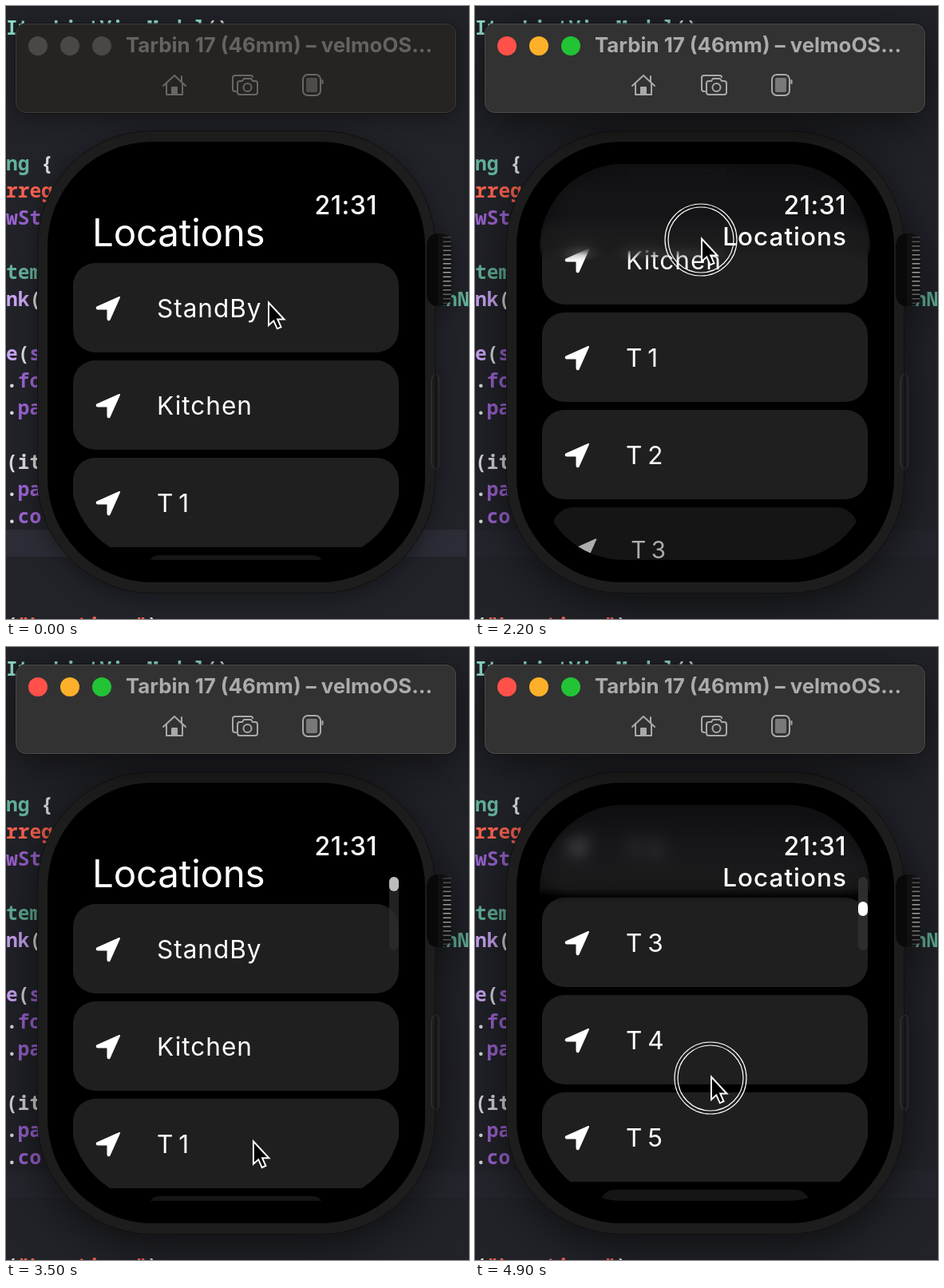
Animation, 580 px wide and 768 px high, one loop 5000 ms. Source, as an HTML page:

```html
<!DOCTYPE html>
<html lang="en">
<head>
<meta charset="utf-8">
<title>Watch simulator</title>
<style>
html, body { margin: 0; width: 100%; height: 100%; overflow: hidden; background: #222329; }
#stage { position: relative; width: 580px; height: 768px; overflow: hidden; background: #222329;
  font-family: Inter, "Open Sans", sans-serif; color: #fff;
  --bar: #262421; --edge: #403e3b; --ink: #696765; --title: #656361; --line: #2b2c35;
  --c1: #4a4845; --c2: #4a4845; --c3: #4a4845; --shade: 0 5px 14px rgba(0,0,0,.4); }
#stage.active { --bar: #323232; --edge: #4b4b4b; --ink: #a9a9a9; --title: #ababab; --line: #25262d;
  --c1: #ff5149; --c2: #ffb02a; --c3: #23c336; --shade: 0 12px 30px rgba(0,0,0,.6); }
svg.full { position: absolute; left: 0; top: 0; width: 580px; height: 768px; }
#code { font: 600 24.5px "Noto Sans Mono", "DejaVu Sans Mono", monospace; white-space: pre; }
.window { filter: drop-shadow(var(--shade)); }
.icon { fill: none; stroke: var(--ink); stroke-width: 2; stroke-linejoin: round; stroke-linecap: round; }
#screen { position: absolute; left: 81px; top: 198px; width: 414px; height: 496px;
  border-radius: 105px; overflow: hidden; }
#screen div { position: absolute; white-space: nowrap; }
#screen .row { left: 3px; top: 0; width: 408px; height: 112px; border-radius: 28px;
  background: #1f1f1f; transform-origin: 50% 0; }
.row svg { position: absolute; left: 28px; top: 41px; width: 32px; height: 32px; }
.row span { position: absolute; left: 105px; top: 0; font-size: 31.5px; line-height: 113px;
  letter-spacing: 1px; word-spacing: -4px; }
#frost, #tint { left: 0; top: 0; width: 414px; height: 125px; }
#frost { backdrop-filter: blur(10px);
  -webkit-mask-image: linear-gradient(#000 82%, transparent 98%); mask-image: linear-gradient(#000 82%, transparent 98%); }
#tint { background: linear-gradient(#0f0f11, rgba(22,22,25,.66) 50%, rgba(26,26,28,.66) 82%, rgba(26,26,28,0) 91%); }
#screen #big { left: 27px; top: 55px; font-size: 47.5px; line-height: 62px; letter-spacing: -.2px; }
#screen #mini { right: 29px; top: 70px; font-size: 31.5px; line-height: 42px; letter-spacing: 1px; font-weight: 500; }
#screen #time { right: 30px; top: 31px; font-size: 32px; line-height: 42px; letter-spacing: .5px; font-weight: 500; }
#track { position: absolute; left: 480px; top: 288px; width: 12px; height: 92px; border-radius: 6px; background: #2d2d2d; }
#thumb { position: absolute; left: 0; width: 12px; height: 18px; border-radius: 6px; background: #fff; }
</style>
</head>
<body>
<div id="stage">
  <svg class="full">
    <rect y="656" width="577" height="34" fill="var(--line)"/>
    <g id="code"></g>
    <g class="window">
      <rect x="527" y="285" width="31" height="91" rx="13" fill="#101011"/>
      <rect x="533" y="461" width="9" height="119" rx="5" fill="#17171a" stroke="#36363a"/>
      <rect x="39.5" y="156.5" width="498" height="579" rx="143" fill="#1d1d1d" stroke="#111"/>
    </g>
    <path d="M541 285q-14 0-14 18v55q0 18 14 18z" fill="#090909"/>
    <g id="ridges"></g>
    <path d="M537 462q-4 2-4 9v99q0 7 4 9" fill="none" stroke="#3a3a3d"/>
    <rect x="52" y="170" width="473" height="552" rx="131" fill="#000"/>
    <g class="window">
      <rect x="11.5" y="21.5" width="553" height="113" rx="13" fill="#0b0b0b"/>
      <rect x="12.5" y="22.5" width="551" height="111" rx="12" fill="var(--bar)" stroke="var(--edge)"/>
    </g>
    <circle cx="40" cy="50" r="12" fill="var(--c1)"/>
    <circle cx="80" cy="50" r="12" fill="var(--c2)"/>
    <circle cx="120" cy="50" r="12" fill="var(--c3)"/>
    <text x="150" y="58" font-size="25.8" font-weight="700" fill="var(--title)">Tarbin 17 (46mm) – velmoOS...</text>
    <g class="icon">
      <path d="M197 100L211 87L225 100M201 97V111H221V97M220 95V88"/>
      <path d="M208 111V102H214V111Z" fill="var(--ink)"/>
      <path d="M288 107H287Q284 107 284 104V90Q284 87 287 87H306Q309 87 309 89"/>
      <path d="M293 94H296L298 91H307L309 94H312Q315 94 315 97V108Q315 111 312 111H293Q290 111 290 108V97Q290 94 293 94Z"/>
      <circle cx="302.5" cy="102" r="5"/>
      <rect x="372" y="86" width="22" height="26" rx="6"/>
      <rect x="376" y="90" width="14" height="18" rx="2" fill="var(--ink)" fill-opacity=".6" stroke="none"/>
      <path d="M396.5 93V97"/>
    </g>
  </svg>
  <div id="screen">
    <div id="rows"></div>
    <div id="frost"></div>
    <div id="tint"></div>
    <div id="big">Locations</div>
    <div id="mini">Locations</div>
    <div id="time">21:31</div>
  </div>
  <div id="track"><div id="thumb"></div></div>
  <svg class="full">
    <g id="pointer">
      <g id="ring" fill="none" stroke="#fff" stroke-width="1.2">
        <circle cy="3" r="45"/><circle cy="3" r="41"/>
      </g>
      <path d="M1 1.5V30L7.300 24.300L11.800 34.300L16.500 32.200L12.200 22.500H20.500Z" fill="#000" stroke="#fff" stroke-width="2"/>
    </g>
  </svg>
</div>
<script>
const $ = id => document.getElementById(id);
const clamp = (v, lo = 0, hi = 1) => Math.min(hi, Math.max(lo, v));
const smooth = u => u * u * (3 - 2 * u);
const ramp = (t, a, b) => smooth(clamp((t - a) / (b - a)));
const pulse = (t, a, b, c, d) => ramp(t, a, b) - ramp(t, c, d);

const DURATION = 5000, STEP = 100;
const PITCH = 122, FIRST = 124, EDGE = 381;

// Editor text: each word takes the next colour, punctuation stays white
const white = '#d9d9dc', teal = '#63b29a', red = '#f7614f', purple = '#9b63d0', lilac = '#c9a3f3';
const code = [
  ['ItemListViewModel()', '#93e3cd'], [], [], [], [],
  ['ng {', teal], ['rreg', red], ['wSt', purple], [],
  ['tem', teal], ['nk(', lilac], [],
  ['e(s', lilac, purple], ['.fo', purple], ['.pa', purple], [],
  ['(it', white], ['.pa', purple], ['.co', purple], [], [], [],
  ['("Locations")', red]
];

function codeLine([text = '', ...colours], row, x = 0) {
  let word = 0;
  const spans = text.replace(/[\w"]+|[^\w"]+/g, part =>
    `<tspan fill="${/\w/.test(part) ? colours[word++] : white}">${part}</tspan>`);
  return `<text x="${x}" y="${36 + row * 34}" xml:space="preserve">${spans}</text>`;
}
$('code').innerHTML = code.map((line, i) => codeLine(line, i)).join('') + codeLine(['inN', teal], 10, 536);

$('ridges').innerHTML = Array.from({ length: 16 }, (_, i) => {
  const glow = 0.2 + 0.6 * Math.sin(Math.PI * (i + 0.5) / 16);
  return `<rect x="547.5" y="${289 + i * 5.5}" width="10" height="1.6" fill="#bbb" opacity="${glow}"/>`;
}).join('');

const arrow = '<svg><path d="M30 2L2 14.5Q1 16 3 16.5H14.5Q15.5 16.5 15.5 17.5V29Q16 31 17.5 30Z" ' +
  'fill="#fff" stroke="#fff" stroke-width="2" stroke-linejoin="round"/></svg>';
const names = ['StandBy', 'Kitchen', ...Array.from({ length: 8 }, (_, i) => 'T ' + (i + 1))];
const rows = names.map(name => {
  const row = document.createElement('div');
  row.className = 'row';
  row.innerHTML = `${arrow}<span>${name}</span>`;
  $('rows').append(row);
  return row;
});

// Key points [time, value, ...], eased in between
const cursor = [[0, 328, 370], [100, 318, 342], [400, 318, 342], [1100, 256, 500], [1200, 256, 500],
  [1700, 267, 282], [2200, 283, 290], [2800, 311, 674], [3100, 311, 674], [4200, 304, 487],
  [4600, 294, 262], [4900, 295, 537]];
const scroll = [[1200, 0], [1750, 182], [2200, 182], [2800, -50], [3400, 0], [4200, 0], [4900, 496]];
const drags = [[1200, 1600], [2200, 2800], [4200, 4600], [4900, 5000]];

function at(track, t, k = 1) {
  const next = track.findIndex(point => point[0] >= t);
  if (next < 1) return track[next < 0 ? track.length - 1 : 0][k];
  const a = track[next - 1], b = track[next];
  return a[k] + (b[k] - a[k]) * ramp(t, a[0], b[0]);
}

function fade(el, opacity, blur, y) {
  el.style.opacity = opacity;
  el.style.filter = blur > 0 ? `blur(${blur}px)` : 'none';
  el.style.transform = `translateY(${y}px)`;
}

function drawRows(s, press) {
  rows.forEach((row, i) => {
    const y = FIRST + i * PITCH - s;
    const low = Math.max(0, y - EDGE);
    const down = i === 1 ? press : 0;
    const shrink = clamp(low * 0.001 + 0.3 * (low / 105) ** 4, 0, 0.6);
    row.style.transform = `translateY(${y + down * 0.6}px) scale(${(1 - shrink) * (1 - 0.01 * down)})`;
    row.style.opacity = clamp(1 - low * 0.018, 0.68) * (1 - 0.18 * down);
  });
}

function draw(t) {
  const s = at(scroll, t);
  const compact = pulse(t, 1350, 1650, 2900, 3300) + ramp(t, 4300, 4600);
  const bar = pulse(t, 1200, 1400, 1900, 2200) + pulse(t, 2200, 2300, 3400, 3700) + ramp(t, 4200, 4300);
  const press = pulse(t, 1100, 1200, 1300, 1700) + pulse(t, 4100, 4200, 4200, 4500);

  $('stage').classList.toggle('active', t >= 1200);
  drawRows(s, press);

  $('frost').style.display = s > 20 ? 'block' : 'none';
  $('tint').style.opacity = clamp(s / 60) * clamp(compact * 2);
  fade($('big'), clamp(1 - compact * 1.95), compact * 20, -s);
  fade($('mini'), clamp(compact * 1.2), (1 - compact) * 11, Math.max(0, -s) * 0.85);

  $('track').style.opacity = bar;
  $('thumb').style.top = clamp(s * 0.0635, 0, 74) + 'px';

  $('pointer').setAttribute('transform', `translate(${at(cursor, t)} ${at(cursor, t, 2)})`);
  $('ring').style.display = drags.some(([a, b]) => t >= a && t < b) ? '' : 'none';
}

const start = performance.now();
function tick() {
  const t = (performance.now() - start) % DURATION;
  draw(Math.floor(t / STEP) * STEP);
  requestAnimationFrame(tick);
}
tick();
</script>
</body>
</html>
```
